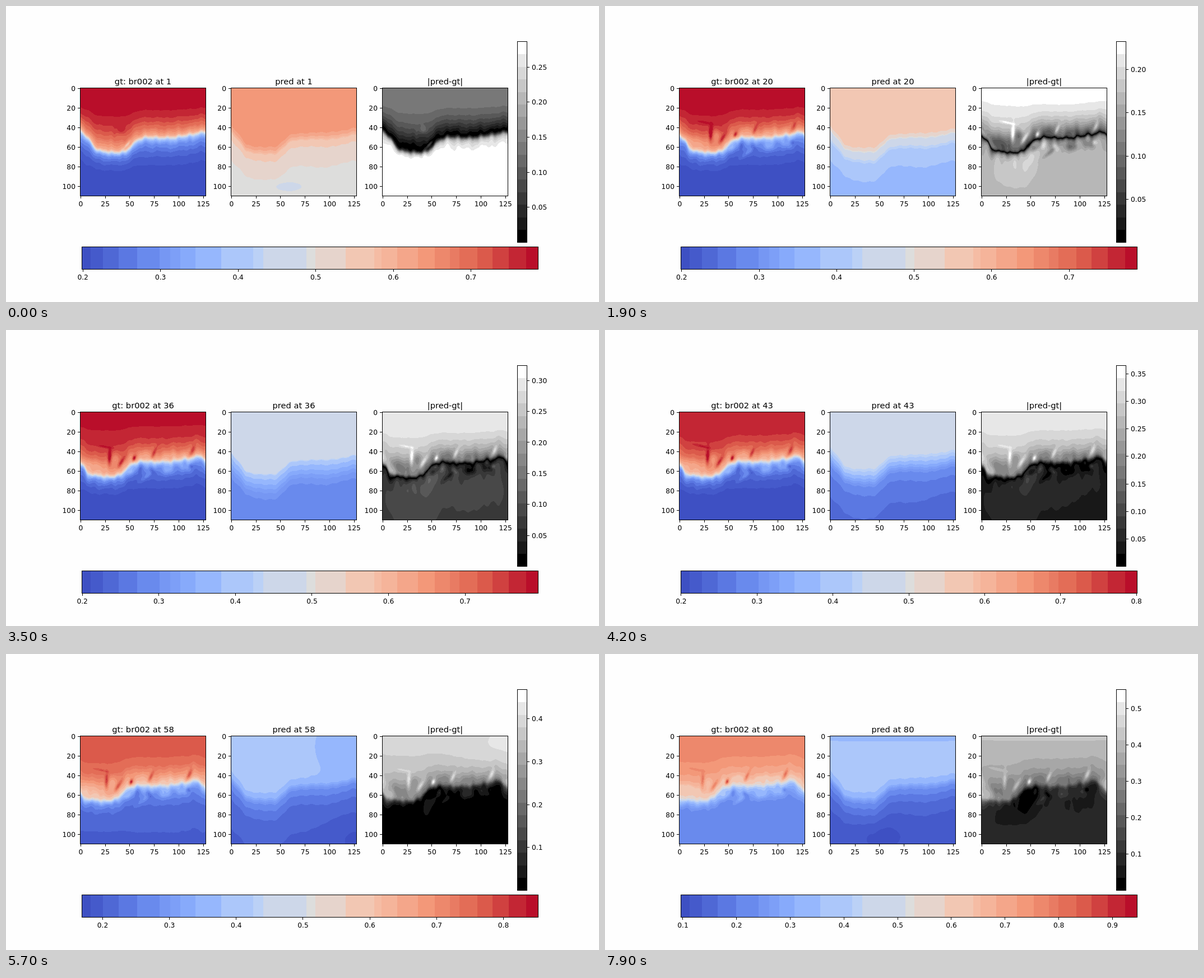
Recreate the animation shown at these times as an HTML page with a canvas. Size 1058 by 529 pixels, loop 8000 ms.

```html
<!DOCTYPE html>
<html lang="en">
<head>
<meta charset="utf-8">
<title>Field comparison</title>
<style>
html, body { margin: 0; width: 100%; height: 100%; overflow: hidden; background: #fefefe; }
canvas { display: block; width: 100vw; height: 100vh; }
</style>
</head>
<body>
<canvas id="stage" width="1058" height="529"></canvas>
<script>
const ctx = document.getElementById('stage').getContext('2d');
const STEPS = 80, STEP_MS = 100;
const W = 224, H = 193, CELL = 1.75, TOP = 146.5;
const PANELS = [132.5, 401.5, 671.5];
const FONT = '"DejaVu Sans", sans-serif';

// Step numbers at which the slow parameters are known
const KEYS = [1, 12, 28, 43, 58, 69, 80];
const V_MIN = [.1988, .1988, .1993, .1997, .169, .1598, .0964];
const V_MAX = [.7866, .7866, .789, .801, .852, .879, .946];
const PRED_TOP = [.65, .602, .53, .453, .39, .392, .37];
const PRED_LOW = [.489, .413, .318, .243, .198, .182, .12];
const ERR_KEYS = [1, 12, 15, 18, 28, 43, 58, 69, 80];
const ERR_MAX = [.286, .2178, .211, .221, .2768, .3646, .4675, .489, .5515];

// Interface points: x, y, total drift to the left
const FRONT = [
  [0, 43, 18], [10, 54, 18], [15, 61, 18], [24, 64, 18], [43, 64.5, 14],
  [48.5, 61, 13.5], [53.5, 56, 13.5], [58, 52, 13], [67, 49.8, 12], [91, 50.2, 13],
  [98, 49, 8], [112.5, 47, 7.5], [127, 44.8, 12], [140, 57, 12]
];

const lerp = (a, b, k) => a + (b - a) * k;

function lookup(xs, ys, x) {
  if (x <= xs[0]) return ys[0];
  for (let i = 1; i < xs.length; i++) {
    if (x <= xs[i]) return lerp(ys[i - 1], ys[i], (x - xs[i - 1]) / (xs[i] - xs[i - 1]));
  }
  return ys[ys.length - 1];
}

function spline(pts, x) {
  const last = pts.length - 1;
  let i = 0;
  while (i < last - 1 && x > pts[i + 1][0]) i++;
  const slope = j => {
    const a = pts[Math.max(0, j - 1)], b = pts[Math.min(last, j + 1)];
    return (b[1] - a[1]) / (b[0] - a[0]);
  };
  const [x0, y0] = pts[i], [x1, y1] = pts[i + 1];
  const h = x1 - x0, t = (x - x0) / h, t2 = t * t, t3 = t2 * t;
  return (2 * t3 - 3 * t2 + 1) * y0 + (t3 - 2 * t2 + t) * h * slope(i)
    + (3 * t2 - 2 * t3) * y1 + (t3 - t2) * h * slope(i + 1);
}

// Plumes: x, y, radii, angle, strength midway and late
const PLUMES = [
  [34, 46, 8, 1.8, 93, .1, .1],
  [46, 51, 7, 2, -58, .08, .12],
  [59, 47, 3, 1.7, -70, .11, .24],
  [79, 42, 6, 1.8, -65, .06, .13],
  [118, 40, 6, 2, -65, .06, .15],
  [29, 35, 8, 1.2, 12, .04, .04],
  [18, 54, 11, 7, 0, -.04, -.05],
  [40, 47, 4, 6, 10, -.05, -.05],
  [69, 42, 4, 5, 20, -.03, -.04],
  [99, 44, 10, 4, 0, -.02, -.04],
  [72, 65, 9, 2, -40, .04, .04],
  [65, 58, 2.5, 4, 20, -.04, -.06],
  [78, 60, 4, 2.5, 50, -.04, -.07],
  [94, 60, 7, 4, 0, .05, .05],
  [117, 55, 2.5, 2.5, 0, -.05, -.08],
  [111, 57, 6, 4, 20, .04, .04],
  [56, 61, 6, 3, -30, .05, .07]
];

// Drifts in the prediction: x, y, radii, strength, step of the peak, fade
const DRIFTS = [
  [47, 99, 25, 6, -.008, 1, 11],
  [48, 100, 28, 16, -.02, 80, 14],
  [127, 105, 30, 24, -.024, 55, 18],
  [127, 10, 45, 40, -.03, 58, 14],
  [78, 10, 38, 12, -.012, 28, 12],
  [64, 0, 150, 5, -.035, 80, 11]
];

function makeBlob(x, y, rx, ry, deg, amp) {
  const c = Math.cos(deg * Math.PI / 180), s = Math.sin(deg * Math.PI / 180);
  return (px, py) => {
    const dx = px - x, dy = py - y;
    const u = (dx * c + dy * s) / rx, v = (dy * c - dx * s) / ry;
    const q = u * u + v * v;
    return q < 7 ? amp * Math.exp(-q) : 0;
  };
}

function sum(blobs, x, y) {
  let total = 0;
  for (const b of blobs) total += b(x, y);
  return total;
}

const frontAt = k => {
  const pts = FRONT.map(([x, y, drift]) => [x - drift * k, y]);
  return x => spline(pts, x);
};

function truthField(n) {
  const k = (n - 1) / (STEPS - 1), grow = lerp(.6, 1.2, Math.min(1, n / 30));
  const top = .787 - Math.max(0, n - 28) * .0004;
  const front = frontAt(k);
  const blobs = PLUMES.map(([x, y, rx, ry, deg, mid, late]) =>
    makeBlob(x - 11 * k, y - k, rx, ry, deg, lookup([1, 16, 80], [mid * .1, mid, late], n)));
  const fade = Math.max(0, 1 - n / 40);
  blobs.push(makeBlob(47, 57, 5, 1.3, -50, -.08 * fade), makeBlob(41, 42, 4, 4, 0, .035 * fade));
  return px => {
    const X = px + .14 * n;
    const c = front(px) + .5 * Math.sin(.55 * X) + .25 * Math.sin(1.1 * X + 2);
    const squeeze = 1 + .5 * Math.max(0, c - 49) / 15;
    return y => {
      const d = y - c, near = grow * Math.exp(-d * d / 500);
      const w = y + near * (Math.sin(.33 * X + .2 * y) + .7 * Math.sin(.71 * X - .15 * y));
      const hi = top - .19 * Math.min(1.1, w / c) ** 3;
      const lo = .199 + .2 * Math.exp(-Math.max(-2, w - c) * squeeze / 10);
      return lo + (hi - lo) / (1 + Math.exp(d / 1.2)) + sum(blobs, px, y);
    };
  };
}

function predField(n) {
  const top = lookup(KEYS, PRED_TOP, n), low = lookup(KEYS, PRED_LOW, n);
  const front = frontAt(0);
  const blobs = DRIFTS.map(([x, y, rx, ry, amp, peak, fade]) =>
    makeBlob(x, y, rx, ry, 0, amp * Math.max(0, 1 - Math.abs(n - peak) / fade)));
  return px => {
    const c = front(px) - .5 + .5 * Math.sin(.6 * px) + .3 * Math.sin(.27 * px);
    return y => {
      const d = y - c + .8 * Math.sin(.13 * px + .06 * y);
      const share = d > 0 ? .68 * Math.exp(-d / 13) : 1 - .32 * Math.exp(d / 4);
      return low + (top - low) * share + sum(blobs, px, y);
    };
  };
}

// Diverging map, cut into the bands of the colour bar
const BAR = { x: 135.5, y: 430.5, w: 814, h: 40 };
const EDGES = [135, 151, 173, 201, 234, 274, 293, 311, 338, 384, 441, 459, 536, 552, 606, 657,
  670, 698, 735, 765, 792, 809, 841, 868, 897, 928, 950];
const STOPS = [[59, 76, 192], [98, 130, 234], [141, 176, 254], [184, 208, 249], [221, 221, 221],
  [245, 196, 173], [244, 154, 123], [222, 96, 77], [180, 4, 38]];

function diverging(f) {
  const i = Math.min(7, Math.floor(f * 8));
  return STOPS[i].map((v, j) => Math.round(lerp(v, STOPS[i + 1][j], f * 8 - i)));
}

const BANDS = EDGES.slice(1).map((e, i) => diverging(((e + EDGES[i]) / 2 - 135) / 815));
const GREYS = Array.from({ length: 16 }, (_, i) => {
  const g = i === 0 ? 0 : i === 15 ? 255 : Math.round((i + .5) / 16 * 255);
  return [g, g, g];
});
const BAND_AT = Array.from({ length: 815 }, (_, i) => BANDS[EDGES.findIndex(e => e > i + 135) - 1]);

const clamp = f => Math.max(0, Math.min(1, f));
const colour = f => BAND_AT[Math.round(clamp(f) * 814)];
const grey = f => GREYS[Math.min(15, Math.floor(clamp(f) * 16))];
const css = c => `rgb(${c.join()})`;
const snap = v => Math.floor(v) + .5;

function line(x0, y0, x1, y1) {
  ctx.beginPath();
  ctx.moveTo(x0, y0);
  ctx.lineTo(x1, y1);
  ctx.stroke();
}

function text(s, x, y, align, size = 12.22) {
  ctx.font = `${size}px ${FONT}`;
  ctx.textAlign = align;
  ctx.fillText(s, x, y);
}

function tickX(x, y, label) {
  line(snap(x), y, snap(x), y + 4.5);
  text(label, x, y + 18, 'center');
}

function drawAxes(x, title) {
  ctx.strokeRect(x, TOP, W, H);
  for (let v = 0; v <= 125; v += 25) tickX(x + (v + .5) * CELL, TOP + H, String(v));
  for (let v = 0; v <= 100; v += 20) {
    const y = TOP + (v + .5) * CELL;
    line(x - 4.5, snap(y), x, snap(y));
    text(String(v), x - 8.6, y + 4.6, 'right');
  }
  text(title, x + W / 2, 139.5, 'center', 14.67);
}

function ticks(lo, hi) {
  const step = [.025, .05, .1].find(s => (hi - lo) / s <= 9);
  const digits = step === .025 ? 3 : step < .1 ? 2 : 1;
  const out = [];
  for (let i = Math.ceil(lo / step - 1e-6); i * step <= hi; i++) {
    out.push([i * step, (i * step).toFixed(digits)]);
  }
  return out;
}

function drawBars(lo, hi, errMax) {
  BANDS.forEach((c, i) => {
    ctx.fillStyle = css(c);
    ctx.fillRect(EDGES[i], BAR.y, EDGES[i + 1] - EDGES[i], BAR.h);
  });
  const gx = 912, gy = 64, gh = 358.5, cell = gh / 16;
  GREYS.forEach((c, i) => {
    const a = Math.round(gy + gh - (i + 1) * cell), b = Math.round(gy + gh - i * cell);
    ctx.fillStyle = css(c);
    ctx.fillRect(gx, a, 18, b - a);
  });
  ctx.fillStyle = '#000';
  ctx.strokeRect(BAR.x, BAR.y, BAR.w, BAR.h);
  ctx.strokeRect(gx + .5, gy - .5, 17, 359);
  for (const [v, label] of ticks(lo, hi)) {
    tickX(BAR.x + (v - lo) / (hi - lo) * BAR.w, BAR.y + BAR.h, label);
  }
  for (const [v, label] of ticks(.0005, errMax)) {
    const y = gy + gh * (1 - v / errMax);
    line(930, snap(y), 934, snap(y));
    text(label, 938, y + 4.6, 'left');
  }
}

const images = PANELS.map(() => ctx.createImageData(W, H));

function put(img, i, c) {
  img.data[i] = c[0];
  img.data[i + 1] = c[1];
  img.data[i + 2] = c[2];
  img.data[i + 3] = 255;
}

function draw(n) {
  const lo = lookup(KEYS, V_MIN, n), hi = lookup(KEYS, V_MAX, n);
  const errMax = lookup(ERR_KEYS, ERR_MAX, n);
  const truth = truthField(n), pred = predField(n);
  ctx.fillStyle = '#fefefe';
  ctx.fillRect(0, 0, 1058, 529);
  for (let px = 0; px < W; px++) {
    const x = (px + .5) / CELL - .5, truthAt = truth(x), predAt = pred(x);
    for (let py = 0; py < H; py++) {
      const y = (py + .5) / CELL - .5, a = truthAt(y), b = predAt(y);
      const i = (py * W + px) * 4;
      put(images[0], i, colour((a - lo) / (hi - lo)));
      put(images[1], i, colour((b - lo) / (hi - lo)));
      put(images[2], i, grey(Math.abs(a - b) / errMax));
    }
  }
  images.forEach((img, i) => ctx.putImageData(img, Math.ceil(PANELS[i]), 147));
  ctx.strokeStyle = ctx.fillStyle = '#000';
  ctx.lineWidth = 1;
  const titles = [`gt: br002 at ${n}`, `pred at ${n}`, '|pred-gt|'];
  PANELS.forEach((x, i) => drawAxes(x, titles[i]));
  drawBars(lo, hi, errMax);
}

let shown = 0;
const start = performance.now();

function tick() {
  const n = Math.floor((performance.now() - start) / STEP_MS) % STEPS + 1;
  if (n !== shown) draw(shown = n);
  requestAnimationFrame(tick);
}
tick();
</script>
</body>
</html>
```
